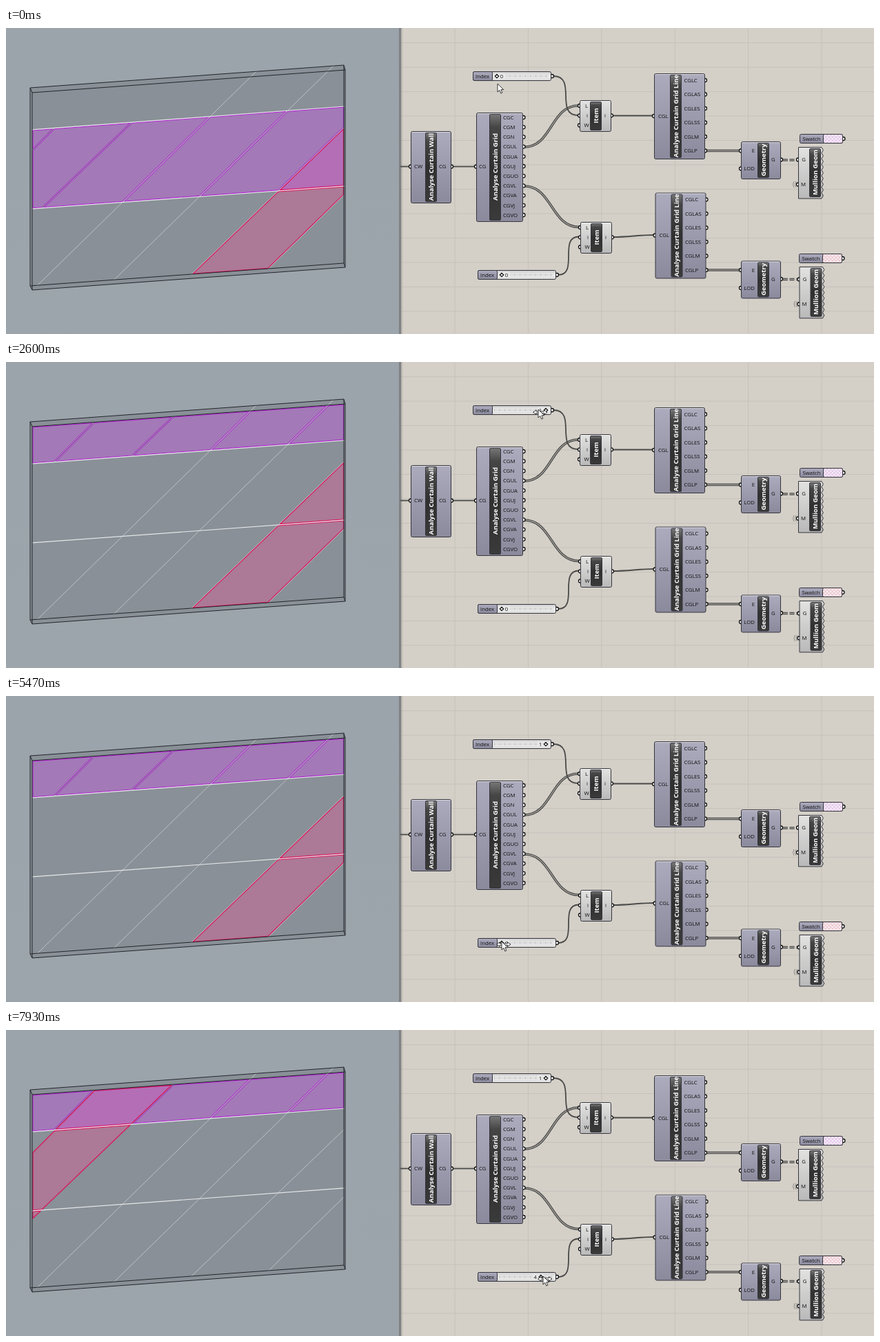
Animation, 1259 px wide and 445 px high, one loop 8000 ms. Source, as an HTML page:

```html
<!DOCTYPE html>
<html lang="en">
<head>
<meta charset="utf-8">
<title>Curtain grid panels</title>
<style>
html, body { margin: 0; width: 100%; height: 100%; overflow: hidden; background: #d4d0c8; }
svg { display: block; }
text { font: 7.8px "Open Sans", "Noto Sans", sans-serif; fill: #111; }
.name { font-weight: 700; font-size: 9.5px; fill: #fff; text-anchor: middle; }
.mid { text-anchor: middle; }
.end { text-anchor: end; }
.wire { fill: none; stroke: #4a4a48; stroke-width: 1.8; }
.list { fill: none; stroke: #4a4a48; stroke-width: 3.6; }
.core { fill: none; stroke: #b4b1ab; stroke-width: 1.1; }
.port { fill: #f4f4f4; stroke: #111; stroke-width: 1.3; }
.edge { fill: none; stroke: #22262a; stroke-width: 1; }
.row { stroke: #e6e8ea; stroke-width: 1.2; }
.diag { stroke: #d9dcdf; stroke-opacity: .65; }
.purple { fill: rgba(190,100,215,.5); stroke: #ba12dc; stroke-width: 1; }
.red { fill: rgba(208,100,150,.5); }
.rim { fill: none; stroke: #e0105a; stroke-width: 1.2; }
</style>
</head>
<body>
<svg id="stage" width="1259" height="445" viewBox="0 0 1259 445">
  <defs>
    <linearGradient id="sky" x2="0" y2="1"><stop stop-color="#9ba3ab"/><stop offset="1" stop-color="#9da5ac"/></linearGradient>
    <linearGradient id="node" x2="0" y2="1"><stop stop-color="#acabbd"/><stop offset="1" stop-color="#8b8a9d"/></linearGradient>
    <linearGradient id="pale" x2="0" y2="1"><stop stop-color="#e2e2e1"/><stop offset="1" stop-color="#b9b9b9"/></linearGradient>
    <linearGradient id="track" x2="0" y2="1"><stop stop-color="#cfcfcf"/><stop offset=".5" stop-color="#ececec"/><stop offset="1" stop-color="#dadada"/></linearGradient>
    <linearGradient id="dark" x2="0" y2="1"><stop stop-color="#777"/><stop offset=".12" stop-color="#464646"/><stop offset=".5" stop-color="#303030"/><stop offset="1" stop-color="#3a3a3a"/></linearGradient>
    <linearGradient id="fade" x2="1" y2="0"><stop stop-color="#000" stop-opacity=".18"/><stop offset="1" stop-color="#000" stop-opacity="0"/></linearGradient>
    <pattern id="grid" x="650.5" y="21" width="106.4" height="35.5" patternUnits="userSpaceOnUse"><path d="M.5 0V36M0 .5H107" stroke="#000" stroke-opacity=".065" fill="none"/></pattern>
    <pattern id="checkP" width="5" height="5" patternUnits="userSpaceOnUse"><path d="M0 0H5V5H0Z" fill="#f6ecf8"/><path d="M0 0H2.5V5H5V2.5H0Z" fill="#e4c9e9"/></pattern>
    <pattern id="checkR" width="5" height="5" patternUnits="userSpaceOnUse"><path d="M0 0H5V5H0Z" fill="#f9ecef"/><path d="M0 0H2.5V5H5V2.5H0Z" fill="#ecc8d2"/></pattern>
  </defs>
  <rect width="572" height="445" fill="url(#sky)"/>
  <path d="M35 87L490 54L492 61V348L38 381L35 375Z" fill="#899097"/>
  <g id="cells"></g>
  <g id="lines"></g>
  <g id="canvas"></g>
  <g id="sliders"></g>
  <g id="cursor" stroke="#222" stroke-width=".9" fill="#fff" stroke-linejoin="round">
    <path id="resize" d="M-7.5 4L-3 .8V2.8H8.5V.8L13 4L8.5 7.2V5.2H-3V7.2Z"/>
    <path d="M0 0V12L2.8 9.4L4.8 14L6.8 13.1L4.9 8.7H8.7Z"/>
  </g>
</svg>
<script>
const $ = id => document.getElementById(id);
const line = (x1, y1, x2, y2, cls) => `<path class="${cls}" d="M${x1} ${y1}L${x2} ${y2}"/>`;
const text = (x, y, s, cls = "") => `<text class="${cls}" x="${x}" y="${y + 2.8}">${s}</text>`;
const port = (x, y) => `<circle class="port" cx="${x}" cy="${y}" r="2.5"/>`;
const box = (x, y, w, h, fill, r = 2) =>
  `<rect x="${x + .5}" y="${y + .5}" width="${w}" height="${h}" rx="${r}" fill="url(#${fill})" stroke="#35353c"/>`;

// Wall geometry: horizontals as [y at x=38, slope], diagonals as [x, y, dx/dy]
const L = 38.5, R = 490;
const rows = [[94, .0727], [148, .075], [263, .073], [375.5, .073]];
const diags = [[131, 84, -.99], [244, 78, -1.04], [356, 70, -1.02],
               [468, 62, -1.023], [490, 145, -1.037], [490, 243, -1.02]];
const rowY = ([a, b], x) => a - b * (x - 38);

function cross([x, y, m], [a, b], inset) {
  const px = (x + m * (a + inset + 38 * b - y)) / (1 + m * b);
  return [px, rowY([a + inset, b], px)];
}

function clipX(pts, limit, sign) {
  const out = [];
  pts.forEach((p, i) => {
    const q = pts[(i + 1) % pts.length];
    const inP = (p[0] - limit) * sign >= 0, inQ = (q[0] - limit) * sign >= 0;
    if (inP) out.push(p);
    if (inP !== inQ) out.push([limit, p[1] + (q[1] - p[1]) * (limit - p[0]) / (q[0] - p[0])]);
  });
  return out;
}

function cell(row, col, cls) {
  const shift = ([x, y, m], d) => [x + d, y, m];
  const left = col ? shift(diags[col - 1], 1.4) : shift(diags[0], -500);
  const right = col < 6 ? shift(diags[col], -1.4) : shift(diags[5], 500);
  const top = rows[row], low = rows[row + 1];
  let pts = [cross(left, top, 1), cross(right, top, 1), cross(right, low, -1.1), cross(left, low, -1.1)];
  pts = clipX(clipX(pts, 39, 1), R - .5, -1);
  if (pts.length < 3) return "";
  return `<polygon class="${cls}" points="${pts.map(p => p.map(v => v.toFixed(1))).join(" ")}"/>`;
}

function drawWall() {
  let s = "";
  for (const r of rows.slice(1, 3)) s += line(L, rowY(r, L), R + 1, rowY(r, R + 1), "row");
  for (const d of diags) {
    const a = cross(d, rows[0], -8), b = cross(d, rows[3], 0);
    const [p, q] = clipX(clipX([a, b], L, 1), R, -1).sort((u, v) => u[0] - v[0]);
    s += line(...p, ...q, "diag");
  }
  s += `<path class="edge" d="M35 87L490 54V342L35 375ZM38 94L492 61V348L38 381ZM35 87L38 94M490 54L492 61M490 342L492 348M35 375L38 381"/>`;
  $("lines").innerHTML = s;
}

function wire(x1, y1, x2, y2, bend, cls = "wire") {
  const d = `d="M${x1} ${y1}C${x1 + bend} ${y1} ${x2 - bend} ${y2} ${x2} ${y2}"`;
  return `<path class="${cls}" ${d}/>` + (cls === "list" ? `<path class="core" ${d}/>` : "");
}

const plate = (x, y, w, h, name) => box(x, y, w, h, "dark", 1.5) +
  `<text class="name" transform="translate(${x + w / 2 + 3.8} ${y + h / 2}) rotate(-90)">${name}</text>`;

// Component with a rotated name plate; pins are [label, x, y, anchor]
function node(x, y, w, h, plateX, name, pins, fill = "node") {
  return box(x, y, w, h, fill) +
    `<path d="M${x + 2} ${y + 1.5}h${w - 3}" stroke="#fff" stroke-opacity=".6"/>` +
    plate(plateX, y + 2, 16, h - 4, name) +
    pins.map(p => text(p[1], p[2], p[0], p[3])).join("");
}

// Labels down the right side with their ports tucked behind the body
function withOutputs(names, x, portX, y, step, body) {
  const list = names.split(" ");
  return list.map((n, i) => port(portX, y + i * step)).join("") + body +
    list.map((n, i) => text(x, y + i * step, n)).join("");
}

function item(x, y) {
  return [8, 22.3, 36.5].map(d => port(x, y + d)).join("") + port(x + 46, y + 22.3) +
    node(x, y, 45, 45, x + 15, "Item",
      [["L", x + 10, y + 8, "mid"], ["i", x + 11, y + 22.3, "mid"], ["W", x + 10, y + 36.5, "mid"], ["i", x + 37, y + 22.3, "mid"]], "pale");
}

function gridLine(x, y) {
  return port(x, y + 62) + withOutputs("CGLC CGLAS CGLES CGLSS CGLM CGLP", x + 43.5, x + 74, y + 10, 20.5,
    node(x, y, 73, 124, x + 23, "Analyse Curtain Grid Line", [["CGL", x + 6, y + 62]]));
}

function geometry(x, y) {
  return port(x, y + 13.5) + port(x, y + 39.5) + port(x + 58, y + 26.5) +
    node(x, y, 57, 54, x + 24, "Geometry",
      [["E", x + 20, y + 13.5, "end"], ["LOD", x + 20, y + 39.5, "end"], ["G", x + 44, y + 26.5]]);
}

function mullion(x, y) {
  let teeth = "";
  for (let i = 0; i < 18; i++) teeth += `l${i % 2 ? -2.4 : 2.4} 4.14`;
  return port(x, y + 18.5) +
    `<path d="M${x - 3} ${y + 50}q-3 4.5 0 9M${x - 6} ${y + 50}q-3 4.5 0 9" fill="none" stroke="#8d8a84"/>` + port(x, y + 54.5) +
    `<path d="M${x + .5} ${y + .5}H${x + 34}${teeth}H${x + .5}Z" fill="url(#pale)" stroke="#35353c"/>` +
    plate(x + 16, y + 2, 16, 70, "Mullion Geom") +
    text(x + 8, y + 18.5, "G", "mid") + text(x + 7.5, y + 54.5, "M", "mid");
}

function swatch(x, y, fill) {
  return port(x + 63.5, y + 7) + box(x, y, 62, 13, "node") + box(x + 34, y, 28, 13, fill) + text(x + 4.5, y + 7, "Swatch");
}

function drawCanvas() {
  let s = `<rect x="572" width="687" height="445" fill="#d4d0c8"/><rect x="572" width="687" height="445" fill="url(#grid)"/>
    <rect x="573" width="3" height="445" fill="url(#fade)"/><rect x="570" width="3" height="445" fill="#7f8284"/>`;
  s += wire(572, 201.5, 586, 201.5, 4) + wire(648, 201.5, 680, 201.5, 8);
  s += wire(752, 173, 830, 113, 40, "list") + wire(752, 230, 831, 289.5, 40, "list");
  s += wire(794, 70, 830, 127, 35) + wire(801, 359, 831, 303.5, 30);
  s += wire(880, 127.5, 938, 127.5, 20) + wire(881, 304, 940, 301, 20);
  for (const y of [178.5, 352]) {
    s += wire(1017, y, 1064, y, 10, "list");
    s += `<g stroke-dasharray="7 2.5">${wire(1127, y + 13.5, 1148, y + 13.5, 5, "list")}</g>`;
  }
  s += port(587, 201.5) + port(646, 201.5) +
    node(587, 150, 58, 104, 608, "Analyse Curtain Wall", [["CW", 592, 201.5], ["CG", 628, 201.5]]);
  s += port(682, 201.5) + withOutputs("CGC CGM CGN CGUL CGUA CGUJ CGUO CGVL CGVA CGVJ CGVO", 721, 750.5, 130, 14.2,
    node(682, 123, 67, 158, 701, "Analyse Curtain Grid", [["CG", 686, 201.5]]));
  s += item(832, 105) + item(833, 282);
  s += gridLine(940, 66) + gridLine(941.5, 239.5);
  s += geometry(1066, 165) + geometry(1066, 338.5);
  s += mullion(1149, 173) + mullion(1150.5, 347);
  s += swatch(1151, 154, "checkP") + swatch(1150, 328, "checkR");
  $("canvas").innerHTML = s;
}

function slider(x, y, handle, value, before) {
  const cy = y + 7;
  return port(x + 115, cy) + box(x, y, 113, 13, "track") + box(x, y, 28, 13, "node") +
    `<path d="M${x + 31} ${cy}H${x + 109}" stroke="#c4c4c4" stroke-width=".8"/>
     <path d="M${x + 31} ${cy}H${x + 109}" stroke="#b4b4b4" stroke-width="3" stroke-dasharray=".7 6.8"/>` +
    `<rect x="${before ? handle - 12 : handle - 4}" y="${cy - 4}" width="16" height="8" fill="#e9e9e9"/>` +
    `<path d="M${handle} ${cy - 2.7}l2.7 2.7l-2.7 2.7l-2.7 -2.7Z" fill="#fff" stroke="#111" stroke-width="1.2"/>` +
    text(x + 4, cy, "Index") + text(handle + (before ? -8 : 7), cy, value, "mid");
}

// Pointer path: [ms, x, y]
const path = [
  [0, 713, 81], [70, 713, 81], [530, 710, 68], [670, 710, 68], [1400, 735, 69], [1670, 735, 69],
  [2070, 750, 69], [2270, 772, 69], [2600, 772, 69], [3000, 723, 68], [3270, 716, 68], [3470, 716, 68],
  [3870, 771, 69], [3930, 777, 69], [4270, 777, 69], [4600, 738, 225], [4850, 694, 380], [4930, 697, 392],
  [5070, 723, 371], [5130, 723, 370], [5470, 719, 357], [5730, 719, 357], [6130, 745, 358], [6600, 745, 358],
  [6870, 760, 358], [6930, 761, 358], [7270, 761, 358], [7600, 778, 358], [7870, 782, 358], [7930, 779, 358], [8000, 779, 358]
];

function pointer(t) {
  const i = Math.max(1, path.findIndex(p => p[0] > t));
  const [t0, x0, y0] = path[i - 1], [t1, x1, y1] = path[i];
  const k = (t - t0) / (t1 - t0);
  return [x0 + (x1 - x0) * k, y0 + (y1 - y0) * k];
}

const rowIndex = t => +((t >= 2120 && t < 2790) || t >= 3660);
const colIndex = t => [5850, 6050, 6860, 7460].filter(s => t >= s).length;

function drawCells(purpleRow, redCol) {
  const column = cls => [0, 1, 2].map(r => cell(r, redCol, cls)).join("");
  let s = column("red");
  for (let c = 0; c < 7; c++) s += cell(purpleRow, c, "purple");
  $("cells").innerHTML = s + column("rim");
}

let shown = "";
function draw(t) {
  // The model view follows the sliders one step late
  const row = rowIndex(t), col = colIndex(t), late = t - 60;
  const viewRow = rowIndex(late), viewCol = colIndex(late);
  const key = [row, col, viewRow, viewCol].join();
  if (key !== shown) {
    shown = key;
    drawCells(1 - viewRow, 5 - viewCol);
    $("sliders").innerHTML = slider(677, 63, 712 + 71 * row, row, row) +
      slider(684, 352, 719 + 14.2 * col, col, col > 2);
  }
  const [x, y] = pointer(t);
  $("cursor").setAttribute("transform", `translate(${x.toFixed(1)} ${y.toFixed(1)})`);
  $("resize").style.display = (t > 330 && t < 4300) || t > 5250 ? "" : "none";
}

drawWall();
drawCanvas();
const step = 1000 / 15;
const start = performance.now();
function tick() {
  const t = (performance.now() - start) % 8000;
  draw(Math.floor((t + 4) / step) * step % 8000);
  requestAnimationFrame(tick);
}
tick();
</script>
</body>
</html>
```
